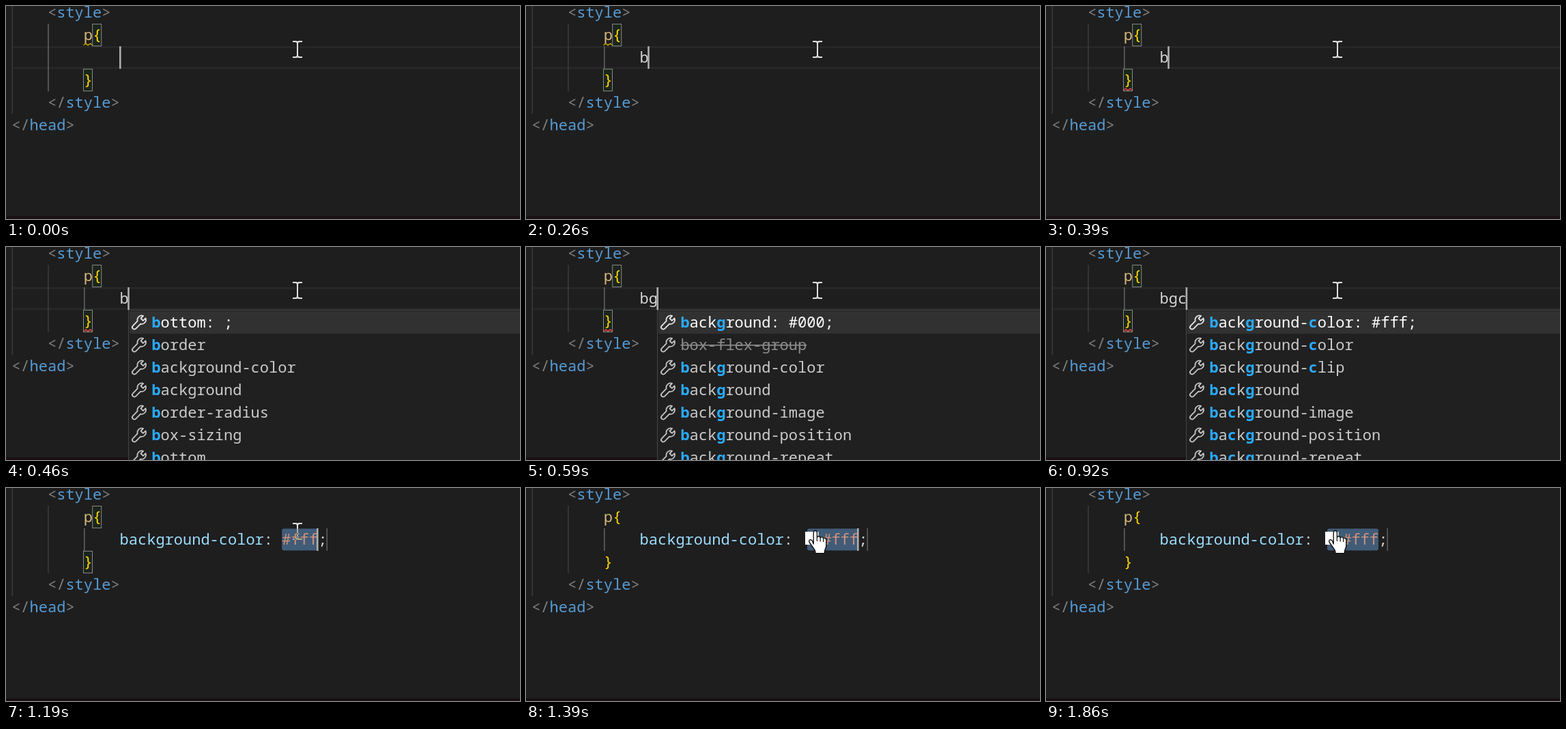
These frames come from a looping animation (753 by 312 pixels, 2.19 s). An HTML page:

```html
<!DOCTYPE html>
<html lang="en">
<head>
<meta charset="utf-8">
<title>Editor completion</title>
<style>
html, body { margin: 0; width: 100%; height: 100%; overflow: hidden; background: #1e1e1e; }
svg { display: block; width: 753px; height: 312px; }
text { font: 22px "Noto Sans Mono", "DejaVu Sans Mono", monospace; white-space: pre; font-variant-ligatures: none; }
.hit { fill: #2aaaff; font-weight: 700; }
.ibeam { mix-blend-mode: difference; }
</style>
</head>
<body>
<svg id="stage" viewBox="0 0 753 312" xmlns="http://www.w3.org/2000/svg"></svg>
<script>
const LOOP = 2190, CHAR = 13.2, LEFT = 8.2, LINE = 33;
const GREY = '#808080', BLUE = '#569cd6', GOLD = '#ffd700', PLAIN = '#d4d4d4';
const stage = document.getElementById('stage');

const colX = col => LEFT + col * CHAR;
const rowY = row => row * LINE - 7;
const esc = s => s.replace(/&/g, '&amp;').replace(/</g, '&lt;');
const rect = (x, y, w, h, fill, extra = '') =>
  `<rect x="${x}" y="${y}" width="${w}" height="${h}" fill="${fill}" ${extra}/>`;
const span = (s, fill) => `<tspan fill="${fill}">${esc(s)}</tspan>`;
const text = (x, y, body, fill = PLAIN) => `<text x="${x}" y="${y}" fill="${fill}">${body}</text>`;
const code = (col, row, ...parts) =>
  text(colX(col), rowY(row) + 24, parts.map(p => span(...p)).join(''));

const caret = x => rect(x, 59, 2.6, LINE, '#aeafad');
const guide = (x, y, h, lit) => rect(x, y, 1.3, h, lit ? '#707070' : '#404040');
const bracketBox = (col, row) =>
  rect(colX(col) - .3, rowY(row) + .5, 13, 32, '#00640019', 'stroke="#888"');

function squiggle(row, color) {
  let d = `M113.5 ${rowY(row) + 31.5}`;
  for (let i = 0; i < 4; i++) d += `l3.3 ${i % 2 ? 2.6 : -2.6}`;
  return `<path d="${d}" fill="none" stroke="${color}" stroke-width="1.5"/>`;
}

// Suggestions for each typed prefix; the digits list the highlighted letters.
const tail = ['background', 'background-image', 'background-position', 'background-repeat'];
const lists = {
  b: ['bottom: ;', 'border', 'background-color', 'background', 'border-radius', 'box-sizing', 'bottom']
    .map(s => [s, [0]]),
  bg: ['background: #000;', 'box-flex-group', 'background-color', ...tail].map(s => [s, [0, 4]]),
  bgc: ['background-color: #fff;', 'background-color', 'background-clip'].map(s => [s, [0, 4, 11]])
    .concat(tail.map(s => [s, [0, 2, 4]]))
};
const wrench = 'M17.6 2.2A6.3 6.3 0 0 0 9.2 9.7L2.4 16.6A3 3 0 0 0 6.7 20.9L13.6 14A6.3 6.3 0 0 0 21 5.6L17.3 9.2L14 5.8Z';

function popup(typed) {
  const x = Math.round(colX(12 + typed.length));
  let out = rect(x - .5, 92.5, 800, 260, '#202020', 'stroke="#454545"') + rect(x + 1, 94, 752, LINE, '#313131');
  lists[typed].forEach(([word, hits], i) => {
    const y = 94 + i * LINE, color = i ? '#cccccc' : '#ffffff';
    out += `<path d="${wrench}" transform="translate(${x + 3.5} ${y + 4.7})" fill="none" stroke="${i ? '#c5c5c5' : '#e8e8e8'}" stroke-width="1.8" stroke-linejoin="round"/>`;
    if (word === 'box-flex-group') {
      out += text(x + 33.4, y + 24, word, '#8c8c8c') + rect(x + 33.4, y + 16, word.length * CHAR, 1.6, '#8c8c8c');
    } else {
      const body = [...word].map((c, n) => hits.includes(n) ? `<tspan class="hit">${c}</tspan>` : esc(c)).join('');
      out += text(x + 33.4, y + 24, body, color);
    }
  });
  return out;
}

const ibeam = '<path class="ibeam" d="M420 51h5q2 0 2 1.2q0-1.2 2-1.2h5v2h-4q-2 0-2 2v17q0 2 2 2h4v2h-5q-2 0-2-1.2q0 1.2-2 1.2h-5v-2h4q2 0 2-2v-17q0-2-2-2h-4z" fill="#fff"/>';
const hand = '<path d="M421.2 82V65.4q0-2.9 2.6-2.9t2.6 2.9v7q.6-1.7 2.5-1.6 2 .1 2.3 2.1.7-1.2 2.3-1 1.9.2 2.1 2.1.7-.9 2-.7 2.3.3 2.3 2.9v7.6q0 3-1.4 5.6-1.1 2.2-1.1 4.2v2H423.8v-2q0-2-1.7-4.2-3.5-4.7-6.6-9.4-1.8-2.9.1-4 1.8-1 3.7 1.2z" fill="#fff" stroke="#111" stroke-width="1.4" stroke-linejoin="round"/>' +
  '<path d="M426.4 72v6M431.2 73v5.5M435.6 74.5v4.5" stroke="#111" stroke-width="1.2"/>';

function stateAt(t) {
  const typed = t < 260 ? '' : t < 590 ? 'b' : t < 920 ? 'bg' : t < 1190 ? 'bgc' : null;
  const done = typed === null;
  return {
    typed, done,
    list: t >= 460 && !done,
    boxes: t < 1260,
    warn: t < 390,
    error: t >= 390 && !done,
    swatch: t >= 1390,
    caret: t < 1860
  };
}

function declaration(s) {
  const x = colX(30) + (s.swatch ? 30 : 0), end = x + 4 * CHAR;
  const start = s.swatch ? 412 : x;
  return rect(start, 59.5, end - start, 32, '#405c79', 'rx="3"') +
    code(12, 2, ['background-color', '#9cdcfe'], [': ', PLAIN]) +
    (s.swatch ? rect(409, 64, 19.5, 19, '#fff') : '') +
    text(x, 83, span('#fff', '#ce9178') + span(';', PLAIN)) +
    rect(end + CHAR - .6, 59, 1.2, LINE, '#707070') +
    (s.caret ? caret(end - 2) : '');
}

function draw(s) {
  let out = rect(0, 0, 753, 312, '#1e1e1e') + rect(0, 308, 753, 4, '#190f14');
  if (!s.done) out += rect(10, 59, 743, 2.5, '#292929') + rect(10, 89.5, 743, 2.5, '#292929');
  out += guide(8.6, 0, 158, false) + guide(61.3, 26, 99, s.typed === '');
  if (s.typed !== '') out += guide(114.2, 59, LINE, true);
  if (s.boxes) out += bracketBox(9, 1) + bracketBox(8, 3);
  out += code(4, 0, ['<', GREY], ['style', BLUE], ['>', GREY]) +
    code(8, 1, ['p', '#d7ba7d'], ['{', GOLD]) +
    code(8, 3, ['}', GOLD]) +
    code(4, 4, ['</', GREY], ['style', BLUE], ['>', GREY]) +
    code(0, 5, ['</', GREY], ['head', BLUE], ['>', GREY]);
  if (s.warn) out += squiggle(1, '#cca700');
  if (s.error) out += squiggle(3, '#f14c4c');
  out += s.done ? declaration(s)
    : code(12, 2, [s.typed, PLAIN]) + caret(colX(12 + s.typed.length) - (s.typed ? 1.6 : .6));
  if (s.list) out += popup(s.typed);
  return out + (s.swatch ? hand : ibeam);
}

let shown = '';
function render(time) {
  const s = stateAt(time % LOOP), key = JSON.stringify(s);
  if (key !== shown) {
    shown = key;
    stage.innerHTML = draw(s);
  }
}

const begin = performance.now();
function tick() {
  render(performance.now() - begin);
  requestAnimationFrame(tick);
}
tick();
</script>
</body>
</html>
```
